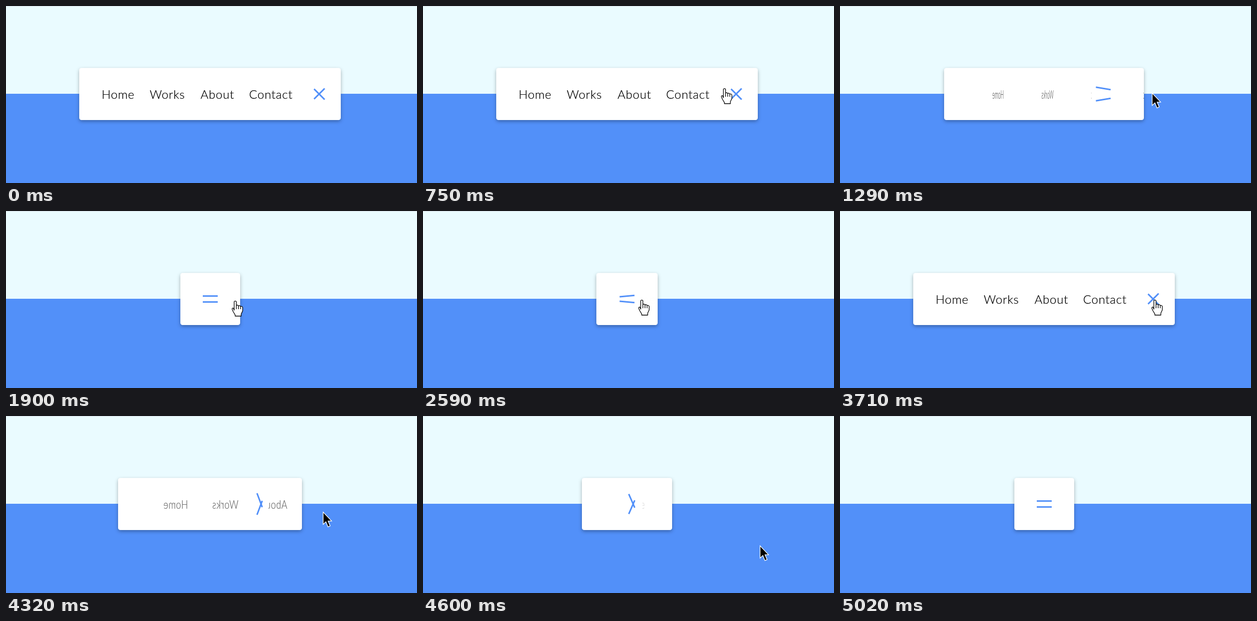
An HTML page for the animation above (5.49 s loop, 825 px wide and 357 px high).

```html
<!DOCTYPE html>
<html lang="en">
<head>
<meta charset="utf-8">
<title>Animated navigation</title>
<style>
  html, body { margin: 0; width: 100%; height: 100%; overflow: hidden; }
  body { background: #5290f9; }
  svg { display: block; width: 825px; height: 357px; }
  .card { fill: #fff; filter: drop-shadow(0 3px 3.75px rgba(0, 0, 0, .3)); }
  .item {
    font: 300 24px Lato, "Open Sans", sans-serif; letter-spacing: .8px;
    fill: #000; stroke: #000; stroke-width: .25px;
  }
  .line { fill: #5290f9; }
  .arrow { fill: #000; stroke: #fff; stroke-width: 1.3; }
  .hand { fill: #fff; stroke: #000; stroke-width: 1.3; stroke-linejoin: round; }
</style>
</head>
<body>
<svg viewBox="0 0 825 357">
  <defs><clipPath id="clip"><rect class="box" y="125" height="105" rx="4.5"/></clipPath></defs>
  <rect width="825" height="177" fill="#eafbff"/>
  <rect width="825" height="1" fill="#d9e1ea"/>
  <rect class="box card" y="125" height="105" rx="4.5"/>
  <g clip-path="url(#clip)">
    <g id="menu"></g>
    <rect id="icon" y="155" height="45" fill="#fff"/>
    <rect class="line" x="-15" y="-1.5" width="30" height="3"/>
    <rect class="line" x="-15" y="-1.5" width="30" height="3"/>
  </g>
  <g id="cursor">
    <path class="arrow" d="M.6 .8V25.5L6.2 20.3L10.3 30.6L14.7 28.7L10.5 18.8H17.6Z"/>
    <path class="hand" d="M-2 19V2.5Q-2 .6 .2 .6T2.4 2.5V10Q2.8 8.6 4.6 8.8T6.6 10.8
      Q7 9.6 8.8 9.9T10.8 12Q11.4 11 13 11.4T15 13.6V20.5L12 27V31H0V28.6
      L-4 22L-6 17.2Q-6.4 15.4-5 14.8T-3 16.4ZM2.4 10V17M6.6 11V17M10.8 12V17"/>
  </g>
</svg>
<script>
const LOOP = 5490, CENTER = 409.5, PAD = 30, ICON = 45, GAP = 15;

// Each click toggles the menu, which starts open.
const CLICKS = [1106, 2586, 4089], TOGGLE = 600;

// The picture advances in steps that restart after each rest.
const TICK = 70, STARTS = [0, 190, 1150, 2520, 4040];

// Label and cell width
const ITEMS = [['Home', 96.5], ['Works', 102], ['About', 97.5], ['Contact', 118]];

// Time, x, y of the pointer tip
const PATH = [
  [190, 692, 300], [640, 593, 178], [820, 613, 158], [1020, 628, 175], [1290, 626, 175],
  [1540, 600, 208], [1850, 460, 181], [2250, 416, 180], [2520, 416, 180], [2940, 551, 175],
  [3640, 632, 179], [4089, 632, 179], [4320, 636, 193], [4950, 727, 346]
];

const $ = id => document.getElementById(id);
const all = sel => [...document.querySelectorAll(sel)];
const clamp = v => Math.min(1, Math.max(0, v));
const set = (el, attrs) => {
  for (const key in attrs) el.setAttribute(key, attrs[key]);
  return el;
};

const menuWidth = ITEMS.reduce((sum, [, width]) => sum + width, 0);
const items = ITEMS.map(([label, width]) => {
  const text = document.createElementNS('http://www.w3.org/2000/svg', 'text');
  text.textContent = label;
  return $('menu').appendChild(set(text, { class: 'item', x: GAP - width / 2, y: 187 }));
});
const boxes = all('.box'), lines = all('.line');
const [arrow, hand] = all('#cursor path');

function hold(t) {
  const start = STARTS.findLast(s => s <= t);
  return start + Math.floor((t - start) / TICK) * TICK;
}

const openness = t => CLICKS.reduce(
  (p, click, i) => p + (i % 2 ? 1 : -1) * clamp((t - click) / TOGGLE), 1);

function tip(t) {
  const i = Math.max(1, PATH.findIndex(key => key[0] > t));
  const [t0, x0, y0] = PATH[i - 1], [t1, x1, y1] = PATH[i];
  const k = (t - t0) / (t1 - t0);
  return [x0 + (x1 - x0) * k, y0 + (y1 - y0) * k];
}

function layout(p) {
  const width = 120 + 405 * p;
  const left = Math.round(CENTER - width / 2), right = Math.round(CENTER + width / 2);

  // Flex row: list plus icon, centred, or shrunk when they overflow.
  const room = width - 2 * PAD, want = p * room, total = want + ICON;
  let list = want, icon = ICON;
  if (total > room) {
    list = Math.max(want * room / total, Math.min(want, menuWidth));
    icon = room - list;
  }
  const start = left + PAD + (room - list - icon) / 2;
  let x = start;
  const centers = ITEMS.map(([, cell]) => (x += cell) - cell / 2);
  return { left, right, centers, icon, iconX: start + list, flip: Math.cos(2 * Math.PI * p) };
}

function drawNav(p, nav) {
  for (const box of boxes) set(box, { x: nav.left, width: nav.right - nav.left });
  items.forEach((text, i) => set(text, {
    transform: `translate(${nav.centers[i]} 0) scale(${nav.flip} 1)`, opacity: p
  }));
  set($('icon'), { x: nav.iconX, width: nav.icon });
  lines.forEach((line, i) => {
    const dir = i ? 1 : -1;
    set(line, {
      transform: `translate(${nav.iconX + 22.5} ${177.5 + 6 * dir})
        rotate(${dir * 765 * p}) translate(0 ${-dir * 7.8 * p})`
    });
  });
}

// True over the icon or over the text of a link.
function clickable(x, y, nav) {
  if (x < nav.left || x > nav.right || y < 155 || y > 200) return false;
  const onIcon = x >= nav.iconX && x <= nav.iconX + nav.icon;
  return onIcon || nav.centers.some((center, i) =>
    Math.abs(x - center) < Math.abs(nav.flip) * (ITEMS[i][1] / 2 - GAP));
}

function drawCursor(t, nav) {
  const shown = t >= 190 && t < 5020;
  set($('cursor'), { visibility: shown ? 'visible' : 'hidden' });
  if (!shown) return;
  const [x, y] = tip(Math.min(t, 4949)).map(Math.round);
  const pointing = clickable(x, y, nav);
  set($('cursor'), { transform: `translate(${x} ${y})` });
  set(arrow, { opacity: pointing ? 0 : 1 });
  set(hand, { opacity: pointing ? 1 : 0 });
}

const begin = performance.now();
function frame() {
  const t = hold((performance.now() - begin) % LOOP);
  const p = openness(t), nav = layout(p);
  drawNav(p, nav);
  drawCursor(t, nav);
  requestAnimationFrame(frame);
}
frame();
</script>
</body>
</html>
```
